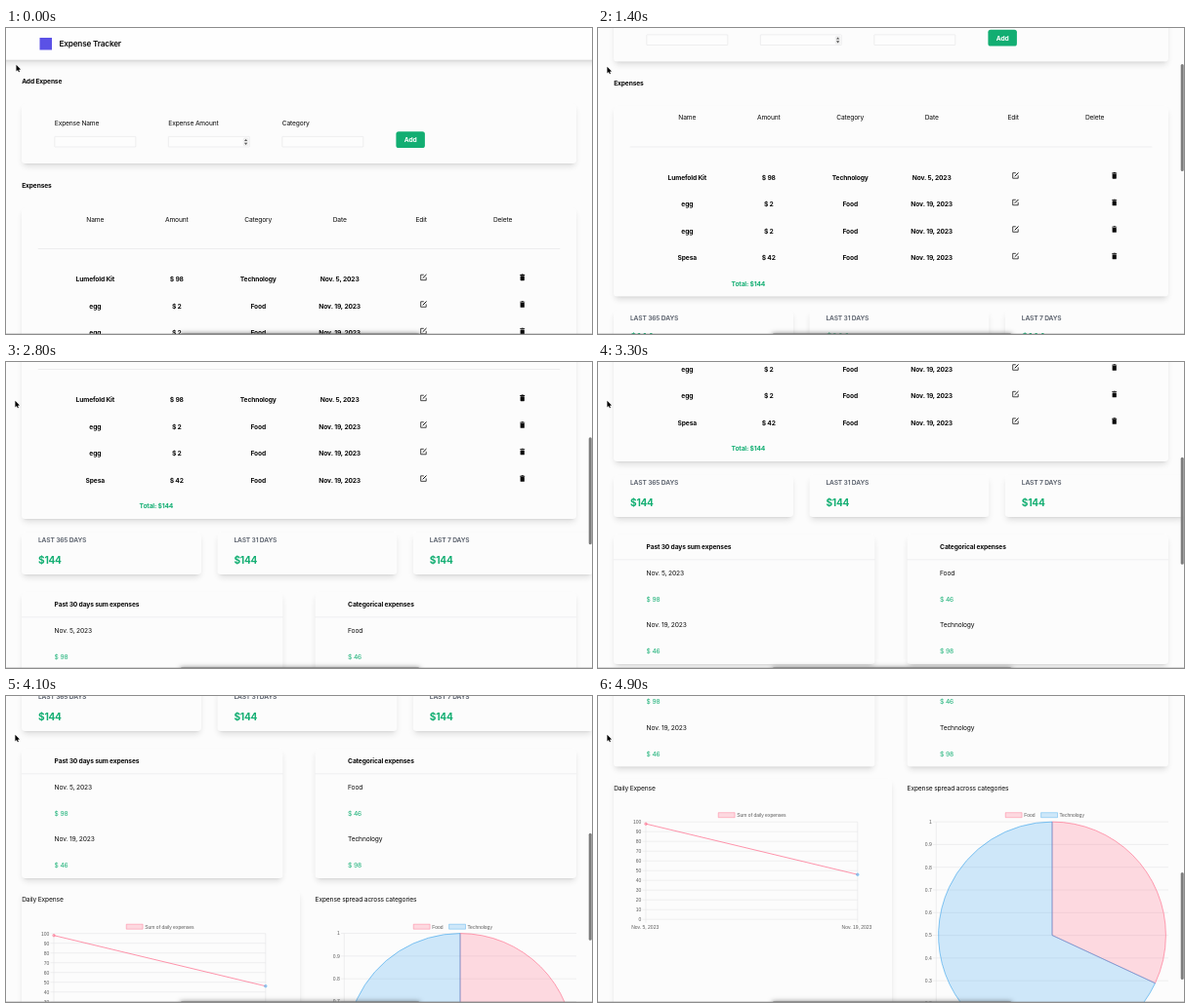
An HTML page with a canvas that plays this animation: 600 by 314 pixels, repeating every 5 s.

```html
<!DOCTYPE html>
<html lang="en">
<head>
<meta charset="utf-8">
<title>Expense Tracker</title>
<style>
  html, body { margin: 0; width: 100%; height: 100%; overflow: hidden; background: #fcfcfc; }
  canvas { display: block; width: 100vw; height: 100vh; }
</style>
</head>
<body>
<canvas id="stage"></canvas>
<script>
const W = 600, H = 314, LOOP = 5000, STEP = 100;
const canvas = document.getElementById('stage');
const ctx = canvas.getContext('2d');
const UI = 'Inter, "Liberation Sans", sans-serif';
const CHART = '"Liberation Sans", Arial, sans-serif';
const BG = '#fcfcfc', INK = '#0a0a0a', GREEN = '#12ae72', RULE = '#e4e4e6';
const PINK = '255,99,132', BLUE = '54,162,235';
let scale = 1;

// [step, scroll offset]
const SCROLL = [[0, 0], [3, 0], [4, 6], [6, 29], [7, 36], [10, 36], [11, 47], [14, 104.5],
  [15, 115], [16, 121], [18, 121], [20, 130], [22, 153], [24, 200], [26, 214], [30, 224],
  [33, 278], [41, 401], [49, 515.5]];

function scrollAt(step) {
  const i = SCROLL.findIndex(p => p[0] >= step);
  if (i <= 0) return 0;
  const [s0, v0] = SCROLL[i - 1], [s1, v1] = SCROLL[i];
  return v0 + (v1 - v0) * (step - s0) / (s1 - s0);
}

function text(str, x, y, o = {}) {
  const { size = 6.67, weight = 400, color = INK, align = 'left', font = UI } = o;
  ctx.font = `${weight} ${size}px ${font}`;
  ctx.letterSpacing = font === UI ? `${-0.022 * size}px` : '0px';
  ctx.textAlign = align;
  ctx.fillStyle = color;
  ctx.fillText(str, x, y + size * 0.36);
}

function box(x, y, w, h, r, fill, stroke, lw = 0.45) {
  ctx.beginPath();
  ctx.roundRect(x, y, w, h, r);
  if (fill) { ctx.fillStyle = fill; ctx.fill(); }
  if (stroke) { ctx.strokeStyle = stroke; ctx.lineWidth = lw; ctx.stroke(); }
}

function line(x0, y0, x1, y1, color = RULE, lw = 0.6) {
  ctx.beginPath();
  ctx.moveTo(x0, y0);
  ctx.lineTo(x1, y1);
  ctx.strokeStyle = color;
  ctx.lineWidth = lw;
  ctx.stroke();
}

function shape(points, fill) {
  ctx.beginPath();
  points.forEach(([x, y]) => ctx.lineTo(x, y));
  ctx.closePath();
  ctx.fillStyle = fill;
  ctx.fill();
}

function shadowBox(x, y, w, h, r, dy, blur, inset, alpha) {
  ctx.save();
  ctx.shadowColor = `rgba(0,0,0,${alpha})`;
  ctx.shadowOffsetY = dy * scale;
  ctx.shadowBlur = blur * scale;
  box(x + inset, y + inset, w - 2 * inset, h - 2 * inset, r, BG);
  ctx.restore();
}

function card(x, y, w, bottom, r = 3.3, fill = BG) {
  const h = bottom - y;
  shadowBox(x, y, w, h, r, 4.17, 6.25, 1.25, 0.12);
  shadowBox(x, y, w, h, r, 1.67, 2.5, 1.67, 0.12);
  box(x, y, w, h, r, fill);
}

function header() {
  card(-10, -10, 620, 32.8, 0, '#fefefe');
  box(34.5, 10, 12.5, 12.5, 0, '#5b51e6');
  text('Expense Tracker', 54.5, 16, { size: 8.2, weight: 600 });
}

function form() {
  text('Add Expense', 16.2, 54.3, { weight: 700 });
  card(16, 77, 568, 139);
  ['Expense Name', 'Expense Amount', 'Category'].forEach((label, i) => {
    const x = 49.8 + i * 116.5;
    text(label, x, 98);
    box(x, 111.4, 83, 10.6, 0.4, '#fdfdfd', '#dedee0', 0.5);
  });
  box(242.8, 112.4, 5.6, 8.8, 1.5, '#efefef');
  shape([[244, 116.1], [245.6, 113.9], [247.2, 116.1]], '#555');
  shape([[244, 117.7], [245.6, 119.9], [247.2, 117.7]], '#555');
  box(399.4, 106.2, 29.5, 16.8, 2.6, GREEN);
  text('Add', 414.2, 114.6, { weight: 700, color: '#fff', align: 'center' });
}

function editIcon(x, y) {
  ctx.beginPath();
  ctx.moveTo(x + 0.3, y - 2.6);
  ctx.lineTo(x - 2.8, y - 2.6);
  ctx.lineTo(x - 2.8, y + 2.9);
  ctx.lineTo(x + 2.7, y + 2.9);
  ctx.lineTo(x + 2.7, y);
  ctx.strokeStyle = INK;
  ctx.lineWidth = 0.75;
  ctx.lineJoin = 'round';
  ctx.stroke();
  line(x - 0.8, y + 0.9, x + 3, y - 2.9, INK, 1);
}

function trashIcon(x, y) {
  box(x - 2.5, y - 2.9, 5, 0.9, 0.2, INK);
  box(x - 1.1, y - 3.4, 2.2, 0.8, 0.2, INK);
  box(x - 2.1, y - 1.7, 4.2, 4.9, 0.6, INK);
}

function expenses() {
  const col = i => 91.3 + i * 83.45;
  text('Expenses', 16.2, 161.2, { weight: 700 });
  card(16, 184, 568, 380);
  ['Name', 'Amount', 'Category', 'Date', 'Edit', 'Delete'].forEach((h, i) =>
    text(h, col(i), 196.5, { align: 'center' }));
  line(32.7, 226.5, 567.3, 226.5);
  const rows = [
    ['Lumefold Kit', '$ 98', 'Technology', 'Nov. 5, 2023'],
    ['egg', '$ 2', 'Food', 'Nov. 19, 2023'],
    ['egg', '$ 2', 'Food', 'Nov. 19, 2023'],
    ['Spesa', '$ 42', 'Food', 'Nov. 19, 2023']
  ];
  rows.forEach((row, r) => {
    const y = 257.6 + r * 27.55;
    row.forEach((cell, i) => text(cell, col(i), y, { weight: 700, align: 'center' }));
    editIcon(427.5, y - 1.8);
    trashIcon(528.7, y - 1.6);
  });
  text('Total: $144', 136.6, 366.8, { weight: 700, color: GREEN });
}

function totals() {
  [365, 31, 7].forEach((days, i) => {
    const x = 16 + i * 200.4;
    card(x, 393.5, 184, 437);
    text(`LAST ${days} DAYS`, x + 17, 402, { weight: 600, color: '#535a66' });
    text('$144', x + 17, 422.2, { size: 10.1, weight: 700, color: GREEN });
  });
}

function summary(x, title, rows) {
  card(x, 454.5, 267.5, 588);
  text(title, x + 33.6, 467.4, { weight: 700 });
  line(x, 480.8, x + 267.5, 480.8);
  rows.forEach((row, i) =>
    text(row, x + 33.6, 494.4 + i * 26.75, { color: i % 2 ? GREEN : INK }));
}

const small = (str, x, y, align) =>
  text(str, x, y, { size: 5, color: '#5c5c5c', font: CHART, align });

function legend(x, label, rgb) {
  box(x, 635.2, 16.9, 5, 0, `rgba(${rgb},.23)`, `rgba(${rgb},.85)`);
  small(label, x + 19, 637.8);
}

function dot(x, y, rgb) {
  ctx.beginPath();
  ctx.arc(x, y, 1.3, 0, Math.PI * 2);
  ctx.fillStyle = `rgba(${rgb},.4)`;
  ctx.fill();
  ctx.strokeStyle = `rgba(${rgb},.85)`;
  ctx.lineWidth = 0.5;
  ctx.stroke();
}

function lineChart() {
  const x0 = 49, x1 = 265.8, yOf = v => 744.7 - v;
  card(16, 600, 285, 885);
  text('Daily Expense', 16.2, 609.8);
  legend(123.2, 'Sum of daily expenses', PINK);
  for (let v = 0; v <= 100; v += 10) {
    line(45.5, yOf(v), x1, yOf(v));
    small(v, 44.3, yOf(v), 'right');
  }
  [x0, x1].forEach(x => line(x, yOf(100), x, yOf(-3.5)));
  small('Nov. 5, 2023', x0 - 0.8, 752.4, 'center');
  small('Nov. 19, 2023', x1 - 0.8, 752.4, 'center');
  line(x0, yOf(98), x1, yOf(46), `rgba(${PINK},.8)`, 0.85);
  dot(x0, yOf(98), PINK);
  dot(x1, yOf(46), BLUE);
}

function slice(from, to, rgb) {
  ctx.beginPath();
  ctx.moveTo(465, 761);
  ctx.arc(465, 761, 116.4, from, to);
  ctx.closePath();
  ctx.fillStyle = `rgba(${rgb},.23)`;
  ctx.fill();
  ctx.strokeStyle = `rgba(${rgb},.9)`;
  ctx.lineWidth = 0.65;
  ctx.stroke();
}

function pieChart() {
  text('Expense spread across categories', 316.6, 609.8);
  legend(417.2, 'Food', PINK);
  legend(453.6, 'Technology', BLUE);
  for (let i = 0; i <= 10; i++) {
    const y = 644.6 + i * 23.3;
    line(343, y, 584, y);
    small(i === 0 ? '1' : i === 10 ? '0' : (1 - i / 10).toFixed(1), 341.8, y, 'right');
  }
  line(346.3, 644.6, 346.3, 877.6);
  const top = -Math.PI / 2, split = top + Math.PI * 2 * 46 / 144;
  slice(top, split, PINK);
  slice(split, top + Math.PI * 2, BLUE);
}

function page() {
  header();
  form();
  expenses();
  totals();
  summary(16, 'Past 30 days sum expenses', ['Nov. 5, 2023', '$ 98', 'Nov. 19, 2023', '$ 46']);
  summary(316.5, 'Categorical expenses', ['Food', '$ 46', 'Technology', '$ 98']);
  lineChart();
  pieChart();
}

function bottomEdge() {
  ctx.save();
  ctx.shadowColor = 'rgba(0,0,0,.5)';
  ctx.shadowBlur = 5 * scale;
  box(178, 313.6, 246, 4, 2, '#777');
  ctx.restore();
  box(0, 313.2, W, 0.8, 0, 'rgba(120,120,120,.4)');
}

function cursor(x, y) {
  ctx.beginPath();
  [[0, 0], [0, 6.6], [1.5, 5.3], [2.5, 7.5], [3.5, 7.1], [2.6, 4.9], [4.6, 4.8]]
    .forEach(([px, py]) => ctx.lineTo(x + px, y + py));
  ctx.closePath();
  ctx.strokeStyle = '#fff';
  ctx.lineWidth = 0.9;
  ctx.stroke();
  ctx.fillStyle = '#000';
  ctx.fill();
}

function render(ms) {
  const step = Math.floor(ms % LOOP / STEP);
  const y = scrollAt(step);
  const dpr = window.devicePixelRatio || 1;
  const w = Math.round(innerWidth * dpr), h = Math.round(innerHeight * dpr);
  if (canvas.width !== w || canvas.height !== h) {
    canvas.width = w;
    canvas.height = h;
  }
  scale = w / W;
  ctx.setTransform(scale, 0, 0, h / H, 0, 0);
  ctx.fillStyle = BG;
  ctx.fillRect(0, 0, W, H);
  ctx.save();
  ctx.translate(0, -y);
  page();
  ctx.restore();
  bottomEdge();
  if (step >= 4) box(596.7, 0.5 + y * 0.35, 3, 110, 1.5, '#7d7d7d');
  if (step < 1) cursor(10.5, 37.8);
  else cursor(9.4, 39.8);
}

const start = performance.now();
function tick() {
  render(performance.now() - start);
  requestAnimationFrame(tick);
}
tick();
</script>
</body>
</html>
```
